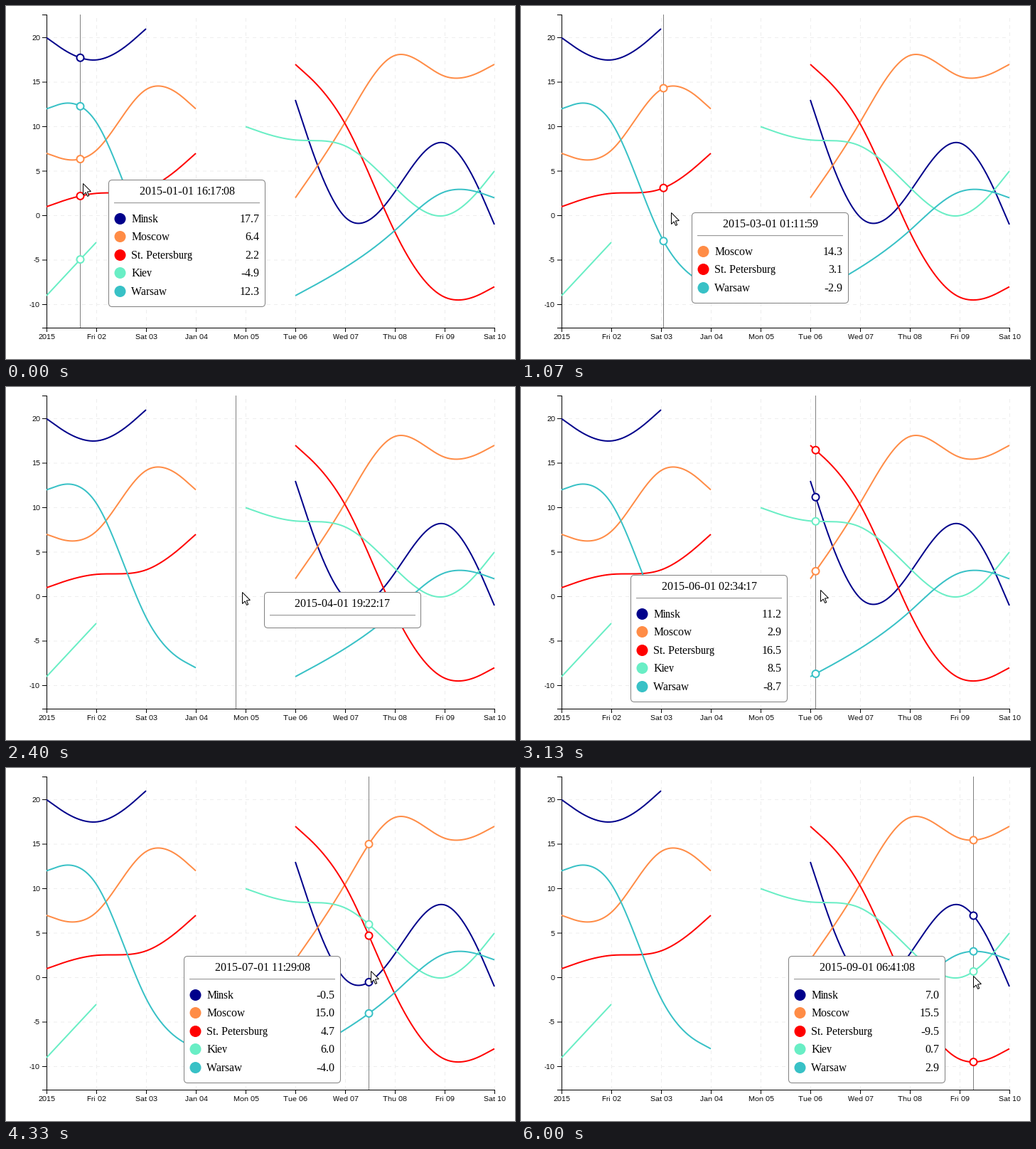
A matplotlib script that plays this animation: 716 px wide and 496 px high, repeating every 6.67 s.

```python
import numpy as np
import matplotlib.pyplot as plt
from matplotlib.animation import FuncAnimation
from matplotlib.patches import Circle, FancyBboxPatch, Polygon

# whole-pixel glyph advances, and strokes left exactly where they are placed
plt.rcParams.update({"text.hinting": "default", "text.hinting_factor": 1,
                     "path.snap": False})

W, H, DPI = 716, 496, 100
PX = 72 / DPI  # points per pixel
LEFT, RIGHT, TOP, BOTTOM = 57, 687, 12, 452
DAY, UNIT, Y_MAX = 70, 12.5, 22.6
FRAMES, INTERVAL, FPS = 230, 29, 15  # the pointer moves at 15 steps a second
TIP_W, TIP_GAP, TIP_HEAD, ROW_H = 220, 40, 50, 25.6

# name, colour, runs of (first day, control values)
CITIES = [
    ("Minsk", "#00008b", [(0, [20, 16, 21]), (5, [13, -4, 2, 12, -1])]),
    ("Moscow", "#ff8c46", [(0, [7, 5, 17, 12]), (5, [2, 10, 21, 14, 17])]),
    ("St. Petersburg", "#ff0000", [(0, [1, 3, 2, 7]), (5, [17, 12, -3, -11, -8])]),
    ("Kiev", "#69eec5", [(0, [-9, -3]), (4, [10, 8, 9, 3, -2, 5])]),
    ("Warsaw", "#38c1c6", [(0, [12, 14, -5, -8]), (5, [-9, -6, -2, 4, 2])]),
]

# pointer stops: (step, x within the plot, y)
STOPS = [(0, 47, 244), (10, 86, 287), (21, 196, 291), (23, 211, 291),
         (25, 211, 291), (47, 357, 285), (62, 452, 285), (64, 452, 285),
         (76, 526, 285), (90, 579, 292), (100, 579, 292)]


def y_px(v):
    return TOP + (Y_MAX - v) * UNIT


def b_spline(values, first, n=80):
    """Uniform cubic B-spline with clamped ends, as (day, value) arrays."""
    pts = np.column_stack([first + np.arange(len(values)), values]).astype(float)
    if len(pts) < 3:
        return pts.T
    pts = np.vstack([pts[:1], pts[:1], pts, pts[-1:], pts[-1:]])
    t = np.linspace(0, 1, n)[:, None]
    basis = [(1 - t) ** 3, 3 * t**3 - 6 * t**2 + 4,
             -3 * t**3 + 3 * t**2 + 3 * t + 1, t**3]
    parts = [sum(b * p for b, p in zip(basis, pts[i:i + 4])) / 6
             for i in range(len(pts) - 3)]
    return np.vstack(parts).T


def track(t, v):
    """Monotone cubic interpolation: smooth travel that rests at holds."""
    h = np.diff(t)
    d = np.diff(v) / h
    a, b = d[:-1], d[1:]
    same = a * b > 0
    inner = np.where(same, 2 * a * b / np.where(same, a + b, 1), 0)
    m = np.r_[d[0], inner, d[-1]]

    def at(x):
        x = min(x, t[-1])
        i = min(np.searchsorted(t, x, "right") - 1, len(h) - 1)
        s = (x - t[i]) / h[i]
        ease = s * s * (3 - 2 * s)
        bend = s * (1 - s) ** 2 * m[i] - s * s * (1 - s) * m[i + 1]
        return round(v[i] + ease * (v[i + 1] - v[i]) + h[i] * bend)
    return at


steps, xs, ys = np.array(STOPS, float).T
pointer_x, pointer_y = track(steps, xs + LEFT), track(steps, ys)

fig = plt.figure(figsize=(W / 100, H / 100), dpi=DPI, facecolor="white")
ax = fig.add_axes([0, 0, 1, 1])
ax.set(xlim=(0, W), ylim=(H, 0))
ax.axis("off")


def line(x, y, color="black", width=1, z=2, **kw):
    return ax.plot(x, y, color=color, lw=width * PX, zorder=z,
                   solid_capstyle="butt", **kw)[0]


def label(x, y, s, font, size, ha, z=2):
    return ax.text(x, y, s, family=font, size=size * PX, ha=ha,
                   va="baseline", color="black", zorder=z)


def draw_axes():
    grid = dict(color="#eeeeee", z=1, dashes=(5, 5))
    x0, y0 = LEFT + 0.5, BOTTOM + 0.5
    line([x0, x0], [TOP, BOTTOM + 1])
    line([LEFT, RIGHT + 1], [y0, y0])
    for y in (TOP + 0.5, y0):
        line([LEFT - 6, LEFT], [y, y])
    for v in range(-10, 21, 5):
        y = y_px(v)
        line([LEFT, RIGHT], [y, y], **grid)
        line([LEFT - 6, LEFT], [y, y])
        label(LEFT - 9, y + 3.5, str(v), "Liberation Sans", 10, "right")
    week = ["Thu", "Fri", "Sat", "Sun", "Mon", "Tue", "Wed"]
    for d in range(10):
        x = x0 + d * DAY
        text = {0: "2015", 3: "Jan 04"}.get(d, f"{week[d % 7]} {d + 1:02d}")
        line([x, x], [BOTTOM, TOP], **grid)
        line([x, x], [BOTTOM, BOTTOM + 6])
        label(x, BOTTOM + 16, text, "Liberation Sans", 10, "center")


draw_axes()
curves = []
for name, color, runs in CITIES:
    splines = [b_spline(values, first) for first, values in runs]
    for days, vals in splines:
        line(LEFT + days * DAY, y_px(vals), color, 2, 3)
    curves.append(splines)

guide = line([0, 0], [TOP, BOTTOM], "#808080", 1, 4)
markers = [ax.add_patch(Circle((0, 0), 5, fc="white", ec=c, lw=2 * PX, zorder=5))
           for _, c, _ in CITIES]

tip = FancyBboxPatch((0, 0), TIP_W, TIP_HEAD, fc="white", ec="#808080", lw=PX,
                     boxstyle="round,pad=0,rounding_size=5", zorder=6)
ax.add_patch(tip)
title = label(0, 0, "", "Liberation Serif", 16, "center", 7)
rule = line([0, 0], [0, 0], "#9a9a9a", 1, 7)
rule_light = line([0, 0], [0, 0], "#eeeeee", 1, 7)
rows = [(ax.add_patch(Circle((0, 0), 8, fc=c, ec="none", zorder=7)),
         label(0, 0, name, "Liberation Serif", 16, "left", 7),
         label(0, 0, "", "Liberation Serif", 16, "right", 7))
        for name, c, _ in CITIES]

ARROW = np.array([(0.5, 0.5), (0.5, 16.5), (4.2, 13), (6.6, 18.4),
                  (8.7, 17.5), (6.4, 12), (11.4, 11.5)])
arrow = ax.add_patch(Polygon(ARROW, closed=True, fc="white", ec="black",
                             lw=PX, zorder=9))


def value_at(splines, day):
    for days, vals in splines:
        if days[0] <= day <= days[-1]:
            return np.interp(day, days, vals)
    return None


def stamp(day):
    d, s = divmod(int(day * 86400), 86400)
    return f"2015-{d + 1:02d}-01 {s // 3600:02d}:{s // 60 % 60:02d}:{s % 60:02d}"


def update(i):
    step = int((i + 1) * INTERVAL * FPS / 1000 + 0.05)
    x, y = pointer_x(step) + 0.5, pointer_y(step) + 0.5
    day = (x - LEFT) / DAY
    values = [value_at(s, day) for s in curves]
    guide.set_xdata([x, x])

    # the box flips to the left near the right edge and stays above the axis
    count = sum(v is not None for v in values)
    height = round(TIP_HEAD + ROW_H * count)
    flip = x + TIP_GAP + TIP_W > RIGHT - 17
    left = x - TIP_GAP - TIP_W if flip else x + TIP_GAP
    top = min(y, BOTTOM - 9.5 - height)
    tip.set_bounds(left, top, TIP_W, height)
    title.set_position((left + TIP_W / 2, top + 20.5))
    title.set_text(stamp(day))
    for r, dy in ((rule, 32), (rule_light, 33)):
        r.set_data([left + 7.5, left + 212.5], [top + dy, top + dy])

    n = 0
    for v, marker, row in zip(values, markers, rows):
        for artist in (marker, *row):
            artist.set_visible(v is not None)
        if v is None:
            continue
        marker.center = (x, y_px(v))
        dot, name, number = row
        mid = top + 54.5 + np.floor(n * ROW_H)
        dot.center = (left + 16, mid)
        name.set_position((left + 32, mid + 5))
        number.set_position((left + 212, mid + 5))
        number.set_text(f"{v:.1f}")
        n += 1

    # the arrow runs one step ahead of the guide line
    arrow.set_xy(ARROW + (pointer_x(step + 1), pointer_y(step + 1)))
    return []


anim = FuncAnimation(fig, update, frames=FRAMES, interval=INTERVAL,
                     repeat=True, repeat_delay=0, blit=False)
plt.show()
```
